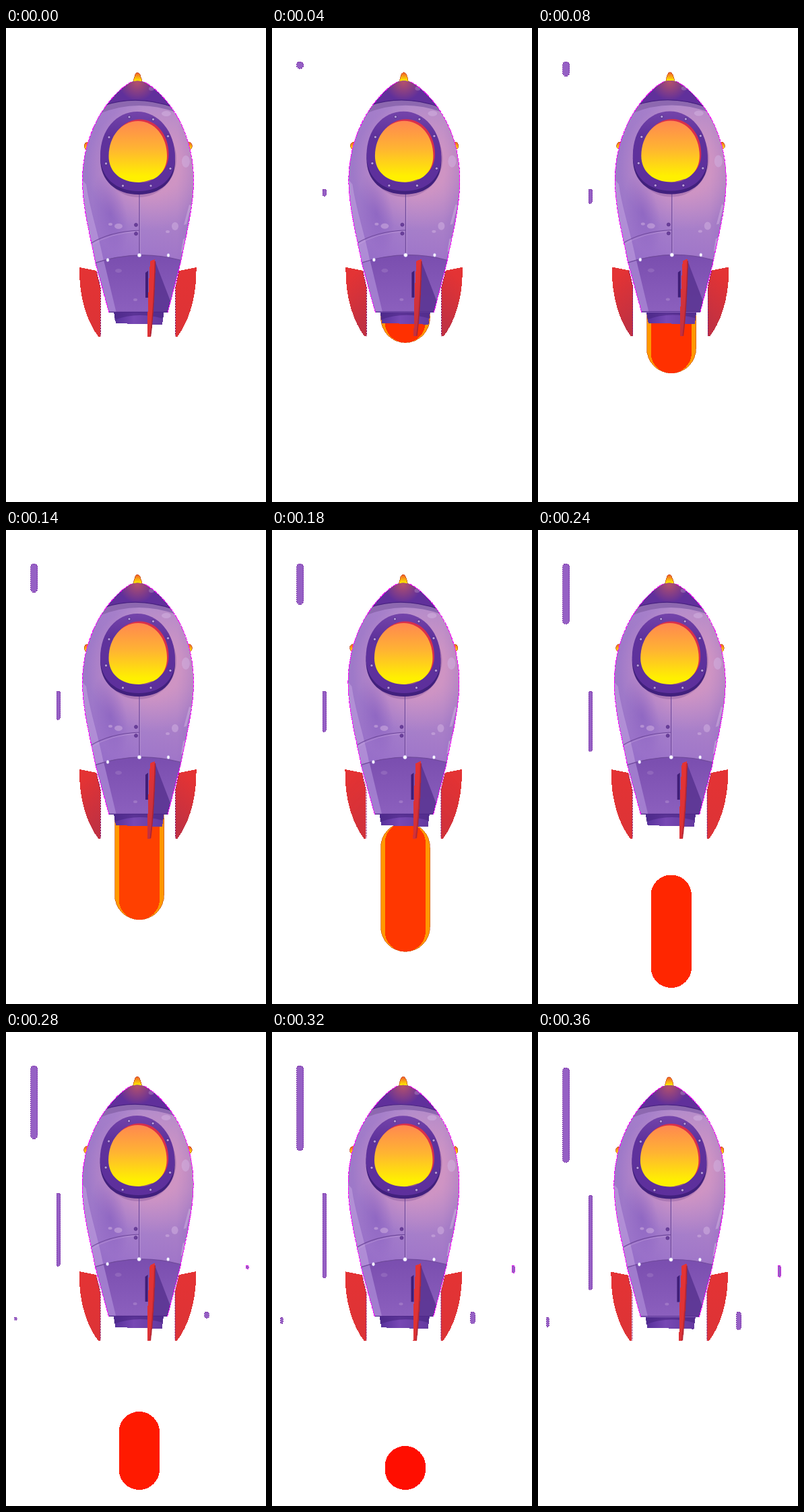
Recreate the animation shown at these times as an HTML page. Size 386 by 703 pixels, loop 380 ms.

```html
<!DOCTYPE html>
<html lang="en">
<head>
<meta charset="utf-8">
<title>Rocket</title>
<style>
  html, body { margin: 0; width: 100%; height: 100%; overflow: hidden; background: #fff; }
  svg { display: block; width: 386px; height: 703px; }
  .crisp { shape-rendering: crispEdges; }
  .rim { fill: none; stroke: #f0f; stroke-width: 1; stroke-dasharray: 5 1; }
  .edge { fill: none; stroke: #8c1a6c; stroke-width: 1; stroke-dasharray: 3 1; }
  .seam { fill: none; stroke: #704a9c; stroke-width: 1.2; }
  .streak { fill: #9560c4; stroke: #8238ae; stroke-width: 1; stroke-dasharray: 2 1; }
  .spot { fill: #d3b4e2; opacity: .5; }
</style>
</head>
<body>
<svg viewBox="0 0 386 703">
  <defs>
    <linearGradient id="hull" x1="0" y1="0" x2="1" y2="0">
      <stop offset="0" stop-color="#9d78c8"/>
      <stop offset=".3" stop-color="#a67fca"/>
      <stop offset=".55" stop-color="#b18bcb"/>
      <stop offset=".85" stop-color="#b58bc8"/>
      <stop offset="1" stop-color="#a37cc3"/>
    </linearGradient>
    <linearGradient id="dusk" x1="0" y1="0" x2="0" y2="1">
      <stop offset=".45" stop-color="#8a5fc8" stop-opacity="0"/>
      <stop offset=".78" stop-color="#8a5fc8" stop-opacity=".5"/>
    </linearGradient>
    <radialGradient id="glow" gradientUnits="userSpaceOnUse" cx="215" cy="205" r="95">
      <stop offset=".45" stop-color="#e09ac0" stop-opacity=".6"/>
      <stop offset="1" stop-color="#d898c8" stop-opacity="0"/>
    </radialGradient>
    <radialGradient id="tipGlow" gradientUnits="userSpaceOnUse" cx="195" cy="80" r="28">
      <stop offset="0" stop-color="#b4506c"/>
      <stop offset="1" stop-color="#b4506c" stop-opacity="0"/>
    </radialGradient>
    <radialGradient id="dim">
      <stop offset="0" stop-color="#8058bc" stop-opacity=".5"/>
      <stop offset="1" stop-color="#8058bc" stop-opacity="0"/>
    </radialGradient>
    <linearGradient id="glass" x1="0" y1="0" x2="0" y2="1">
      <stop offset="0" stop-color="#ff8850"/>
      <stop offset=".45" stop-color="#ffb432"/>
      <stop offset=".9" stop-color="#fff000"/>
    </linearGradient>
    <linearGradient id="ring" x1="0" y1="0" x2="0" y2="1">
      <stop offset="0" stop-color="#7444aa"/>
      <stop offset=".3" stop-color="#5f329c"/>
      <stop offset="1" stop-color="#5d2f9c"/>
    </linearGradient>
    <linearGradient id="lamp" x1="0" y1="0" x2="0" y2="1">
      <stop offset=".1" stop-color="#f26628"/>
      <stop offset=".85" stop-color="#ffe600"/>
    </linearGradient>
    <linearGradient id="skirt" x1="0" y1="0" x2="0" y2="1">
      <stop offset="0" stop-color="#7a4eaf"/>
      <stop offset="1" stop-color="#8c60be"/>
    </linearGradient>
    <linearGradient id="nozzle" x1="0" y1="0" x2="1" y2="0">
      <stop offset="0" stop-color="#55309a"/>
      <stop offset=".4" stop-color="#7748b4"/>
      <stop offset="1" stop-color="#63399f"/>
    </linearGradient>
    <linearGradient id="fin" x1="0" y1="0" x2="0" y2="1">
      <stop offset="0" stop-color="#e43334"/>
      <stop offset="1" stop-color="#dc3336"/>
    </linearGradient>
    <linearGradient id="shade" x1="0" y1="0" x2=".3" y2="1">
      <stop offset=".2" stop-color="#8c2c58" stop-opacity="0"/>
      <stop offset="1" stop-color="#8c2c58" stop-opacity=".35"/>
    </linearGradient>
    <path id="body" d="M153 422 L133 349 C126 312 113.500 268 113.500 225 C114 178 130 137 155 107 Q172 87 186 80 Q195 77 205 80 Q220 87 238 108 C263 138 278 178 278.500 225 C278.500 268 266 312 259 349 L240 422Z"/>
    <clipPath id="inBody"><use href="#body"/></clipPath>
    <path id="pane" d="M152.500 190 C152.500 160 172 138 196 138 C220 138 239 160 239 190 C239 214 221 229 197 229 C171 229 152.500 214 152.500 190Z"/>
    <path id="frame" d="M140 189 C140 151 164 124 195 124 C226 124 251 153 251 192 C251 223 229 242 197 242 C163 242 140 222 140 189Z"/>
    <path id="sideFin" d="M109 355 L134 360 L140 385 V457.500 H137 C122 438 108 402 109 355Z"/>
    <path id="midFin" d="M214 346 L221 343 L222 348 Q220 420 215 457.500 H210 Q210 405 214 346Z"/>
  </defs>

  <g class="crisp">
    <g id="streaks"></g>
    <rect id="outer" x="161.5" width="73" fill="#ff9800" stroke="#c64400" stroke-width=".6"/>
    <rect id="inner" x="167.5" width="60.5"/>
  </g>

  <g id="rocket">
    <g class="crisp" fill="url(#lamp)" stroke="#c04018" stroke-width=".7">
      <path d="M189 80 Q191 66 195 66 Q200 66 202 80Z"/>
      <ellipse cx="120.5" cy="175" rx="4.5" ry="5.5"/>
      <ellipse cx="272" cy="175" rx="4.5" ry="5.5"/>
    </g>
    <path class="crisp" d="M160 421 H234.500 L232 440 L163 438Z" fill="url(#nozzle)"/>
    <path d="M161 421 H234 L233 431 Q195 420 161 433Z" fill="#482582" opacity=".6"/>

    <g class="crisp">
      <use href="#body" fill="url(#hull)"/>
      <use href="#body" fill="url(#dusk)"/>
    </g>
    <g clip-path="url(#inBody)">
      <rect x="110" y="105" width="172" height="240" fill="url(#glow)"/>
      <ellipse cx="155" cy="275" rx="24" ry="60" fill="url(#dim)" transform="rotate(-12 155 275)"/>
      <path d="M139 127 Q195 104 252 125 L238 100 H155Z" fill="#8d68b0"/>
      <path d="M145 115 Q195 98 250 118 V70 H140Z" fill="#60309b"/>
      <path d="M145 115 Q195 98 250 118 V70 H140Z" fill="url(#tipGlow)"/>
      <path d="M145 115 Q195 98 250 118" fill="none" stroke="#492382" stroke-width="1.2"/>
      <path d="M113 225 C113 268 126 312 133 349 L145 346 C138 308 124 268 119 232Z" fill="#c8a8e4" opacity=".5"/>
      <path d="M128 349 Q198 326 264 346 V424 H150Z" fill="url(#skirt)"/>
      <path d="M131 349 L145 344 L164 423 H150Z" fill="#ab88d6" opacity=".75"/>
      <path d="M221 345 L246 410 L240 423 H216Z" fill="#593391" opacity=".85"/>
      <path d="M128 350 Q198 326 264 346" class="seam"/>
      <path d="M125 320 Q153 302 198 300 M198 246 V337" class="seam"/>
      <path d="M127 322 Q154 304 197 302 M199.500 248 V335" fill="none" stroke="#d0ade0" stroke-width=".7" opacity=".6"/>
      <g class="spot">
        <ellipse cx="267" cy="198" rx="6" ry="9"/>
        <ellipse cx="238" cy="127" rx="7" ry="4"/>
        <ellipse cx="167" cy="294" rx="6" ry="4"/>
        <ellipse cx="155" cy="291" rx="3" ry="2"/>
        <ellipse cx="251" cy="294" rx="5" ry="6"/>
        <ellipse cx="240" cy="302" rx="3" ry="2"/>
        <ellipse cx="216" cy="90" rx="4" ry="3" opacity=".6"/>
        <ellipse cx="167" cy="360" rx="5" ry="3" opacity=".4"/>
        <ellipse cx="192" cy="403" rx="3" ry="2" opacity=".6"/>
        <path d="M272 262 L275 263 L268 291 L264 292Z M263 313 L267 312 L264 331 L260 332Z"/>
      </g>
      <path d="M152 421.500 H241" stroke="#4d2889" stroke-width="1.5"/>
    </g>
    <path class="rim crisp" d="M153 422 L133 349 C126 312 113.500 268 113.500 225 C114 178 130 137 155 107 Q172 87 186 80 M205 80 Q220 87 238 108 C263 138 278 178 278.500 225 C278.500 268 266 312 259 349 L240 422"/>

    <ellipse cx="197" cy="194" rx="56" ry="57" fill="#70438f" opacity=".3"/>
    <use href="#frame" y="5" fill="#41207d"/>
    <use href="#frame" fill="url(#ring)"/>
    <use href="#pane" x="2.5" y="-2.5" fill="#d92f4b"/>
    <use href="#pane" fill="url(#glass)"/>
    <path d="M200 229 Q213 230 218 224 Q210 227 200 229Z" fill="#8b4d8c"/>
    <g id="bolts" fill="#b99adb" stroke="#3e2077" stroke-width=".7"></g>
    <g fill="#6b3f9c" stroke="#4f2c80" stroke-width=".6">
      <circle cx="193" cy="292" r="2.5"/>
      <circle cx="193" cy="305" r="2.5"/>
    </g>
    <g fill="#fff" stroke="#c2b4f0" stroke-width=".6">
      <ellipse cx="151" cy="344" rx="2" ry="2.6"/>
      <circle cx="198" cy="337" r="2.7"/>
      <ellipse cx="241" cy="337" rx="2" ry="2.6"/>
    </g>

    <path d="M207 363 L211 360 V400 H207Z" fill="#3f1e78"/>
    <g class="crisp">
      <g fill="url(#fin)">
        <use href="#sideFin"/>
        <use href="#sideFin" transform="matrix(-1 0 0 1 391.5 0)"/>
        <use href="#midFin"/>
      </g>
      <g id="dark" fill="url(#shade)">
        <use href="#sideFin"/>
        <use href="#sideFin" transform="matrix(-1 0 0 1 391.5 0)"/>
        <use href="#midFin"/>
      </g>
      <path class="edge" d="M134.500 361 L140 385 V457 M257 361 L251.500 385 V457"/>
    </g>
    <path d="M221.500 346 Q219.500 420 214.500 457" fill="none" stroke="#a92434" stroke-width="1.6"/>
  </g>
</svg>
<script>
  const LOOP = 380, TICK = 20;
  const $ = id => document.getElementById(id);

  function make(tag, attrs, parent) {
    const el = document.createElementNS('http://www.w3.org/2000/svg', tag);
    set(el, attrs);
    return parent.appendChild(el);
  }
  function set(el, attrs) {
    for (const k in attrs) el.setAttribute(k, attrs[k]);
  }
  // Linear track through [time, value] points, held at both ends.
  function track(pts, t) {
    if (t <= pts[0][0]) return pts[0][1];
    for (let i = 1; i < pts.length; i++) {
      const [a, u] = pts[i - 1], [b, v] = pts[i];
      if (t <= b) return u + (v - u) * (t - a) / (b - a);
    }
    return pts[pts.length - 1][1];
  }

  for (const [cx, cy] of [[183, 132], [218.5, 135.5], [153, 162], [240.5, 160.5],
                          [148.5, 201], [244, 208.5], [173.5, 234], [215, 234]])
    make('circle', { cx, cy, r: 2.1 }, $('bolts'));

  const longGrow = [[40, 0], [60, 4], [80, 11], [140, 32], [200, 59], [240, 79], [280, 98], [360, 133]];
  const longDrop = [[320, 0], [360, 3]];
  const shortGrow = [[280, 0], [320, 8], [360, 17]];
  const noDrop = [[0, 0]];

  const streaks = [
    { x: 36.5, y: 50, w: 10, h: 10.5, from: 40, grow: longGrow, drop: longDrop },
    { x: 75, y: 239, w: 5.5, h: 10.5, from: 40, grow: longGrow, drop: longDrop },
    { x: 294.5, y: 415, w: 7, h: 9.5, from: 280, grow: shortGrow, drop: noDrop },
    { x: 12.5, y: 423, w: 3.5, h: 4.5, from: 280, grow: [[280, 0], [360, 10]], drop: noDrop },
    { x: 356, y: 346, w: 4.5, h: 5.5, from: 280, grow: [[280, 0], [360, 12]], drop: noDrop, hue: '#e010e8' }
  ];
  for (const s of streaks) {
    s.el = make('rect', { class: 'streak', x: s.x, width: s.w, rx: s.w / 2 }, $('streaks'));
    if (s.hue) s.el.style.stroke = s.hue;
  }

  const swayX = [[0, 0], [80, .8], [140, 0], [200, -.8], [240, -.3], [360, -.6]];
  const swayY = [[0, 0], [80, -.5], [140, 0], [280, 0], [360, .6]];
  const flameTop = [[150, 390], [180, 434], [200, 460], [280, 563], [320, 614]];
  const flameEnd = [[20, 444], [80, 512], [140, 578], [200, 649], [226, 679]];
  const heat = [[80, 48], [140, 64], [200, 50], [240, 38], [280, 26], [320, 14]];

  function draw(t) {
    set($('rocket'), { transform: `translate(${track(swayX, t)} ${track(swayY, t)})` });
    $('dark').style.opacity = track([[0, 0], [40, 1], [140, 1], [200, .1], [240, 0]], t);

    const y = track(flameTop, t), height = track(flameEnd, t) - y;
    set($('outer'), { y, height, rx: Math.min(36.5, height / 2),
      visibility: t >= 20 && t < 240 ? 'visible' : 'hidden' });
    set($('inner'), { y, height, rx: Math.min(30.2, height / 2),
      fill: `rgb(255 ${Math.round(track(heat, t))} 0)`,
      visibility: t >= 20 && t < 340 ? 'visible' : 'hidden' });

    for (const s of streaks) {
      const drop = track(s.drop, t);
      set(s.el, { y: s.y + drop, height: s.h + track(s.grow, t) - drop,
        visibility: t >= s.from ? 'visible' : 'hidden' });
    }
  }

  function frame(now) {
    draw(Math.floor((now % LOOP) / TICK) * TICK);
    requestAnimationFrame(frame);
  }
  draw(0);
  requestAnimationFrame(frame);
</script>
</body>
</html>
```
